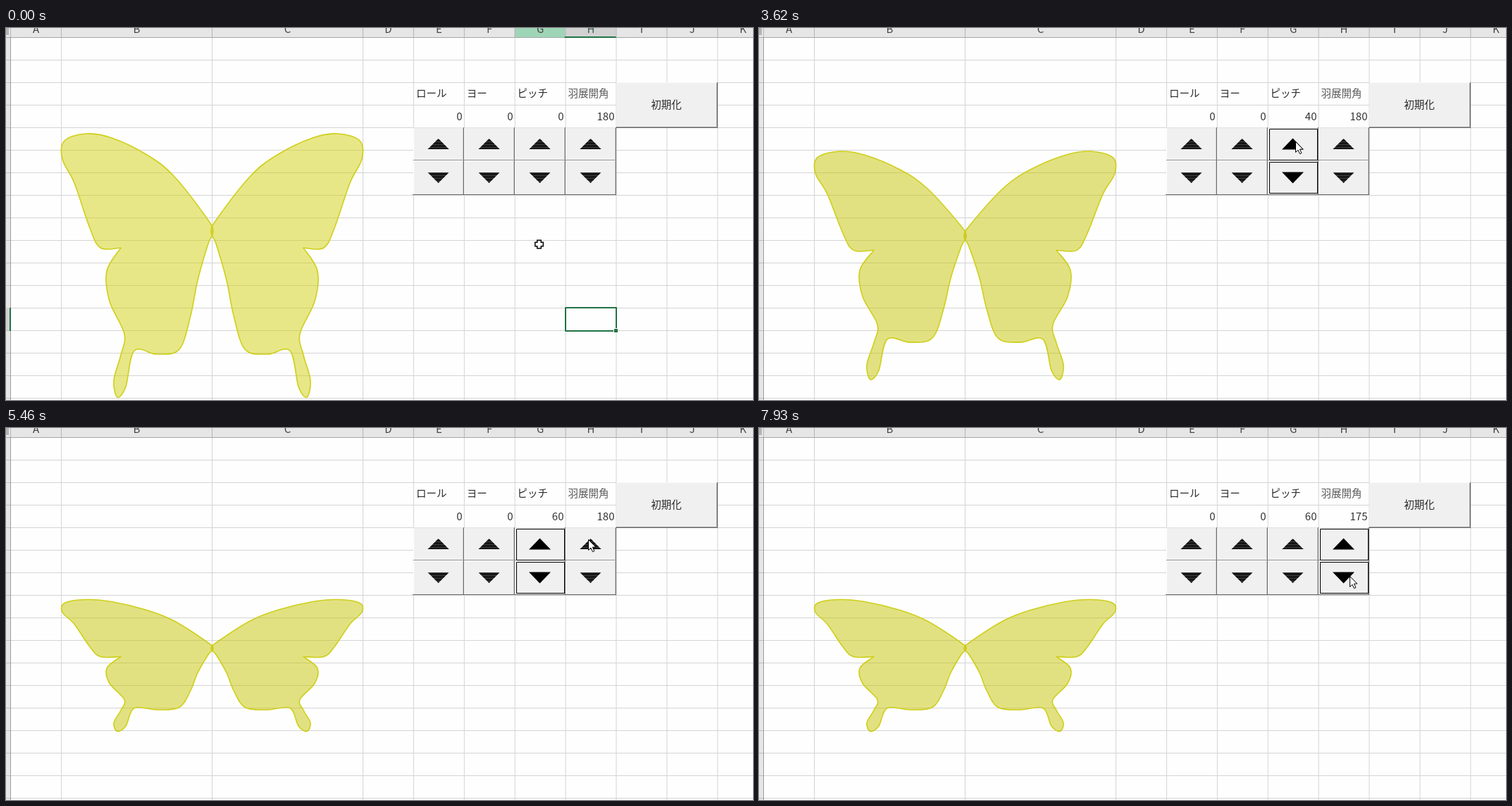
Animation of 1060x528 px, one loop 7.99 s. Source, as an HTML page with a canvas:

```html
<!DOCTYPE html>
<html lang="ja">
<head>
<meta charset="utf-8">
<style>
html, body { margin: 0; width: 100%; height: 100%; overflow: hidden; background: #fefefe; }
canvas { display: block; width: 1060px; height: 528px; }
</style>
</head>
<body>
<canvas id="stage" width="1060" height="528"></canvas>
<script>
const ctx = document.getElementById('stage').getContext('2d');
const LOOP = 7990;
const FONT = '"Noto Sans CJK JP", "Noto Sans CJK", sans-serif';
const GREEN = '#217346';
const AXIS = 292.5, MID = 337, ROW = 32;
const RELEASE = 1710;
const PITCH = 2, SPREAD = 3;

// Left edge of column i: A is narrow, B and C wide, the rest even
const colX = i => i === 0 ? 6 : i < 3 ? 78 + 214 * (i - 1) : 506 + 71.9 * (i - 3);

// Key points of the left wing, from the notch round to the notch again
const WING = [
  [163, 312], [143, 345], [147, 388], [168, 434], [163, 464], [153, 500], [158, 524],
  [170, 509], [182, 458], [214, 463], [246, 456], [262, 408], [272, 358], [287, 306],
  [294, 289], [285, 270], [238, 210], [200, 180], [150, 156], [114, 150], [83, 160],
  [80, 186], [97, 220], [119, 284], [134, 312], [163, 312]
];

// Runs of clicks; short gaps are a held button
const RUNS = [
  { col: PITCH, start: RELEASE, by: 0 },
  { col: PITCH, start: 2090, gap: 580, count: 2 },
  { col: PITCH, start: 2980, gap: 125, count: 6 },
  { col: PITCH, start: 3860, gap: 150, count: 3 },
  { col: PITCH, start: 4610 },
  { col: SPREAD, start: 5750 },
  { col: SPREAD, start: 6070, gap: 200, count: 2 },
  { col: SPREAD, start: 6770 },
  { col: SPREAD, start: 7370, gap: 120, count: 5, by: -5 }
];
const CLICKS = RUNS.flatMap(({ col, start, gap = 500, count = 1, by = 5 }) =>
  Array.from({ length: count }, (_, i) => ({ col, by, at: start + i * gap, single: gap > 180 })));

// Pointer moves: start, end, destination
const HOME = [757, 307];
const MOVES = [
  [870, 1600, 762, 168], [RELEASE, 1880, 761, 161], [4930, 5700, 845, 157], [7010, 7330, 838, 210]
];

const clickSum = (col, t) => CLICKS.reduce((v, c) => c.col === col && c.at <= t ? v + c.by : v, 0);
const pitchAt = t => clickSum(PITCH, t);
const spreadAt = t => 180 + clickSum(SPREAD, t);
const focusAt = t => CLICKS.reduce((v, c) => c.at <= t ? c.col : v, -1);
const pressedAt = t => CLICKS.some(c => c.single && t >= c.at && t < c.at + 90);

function mouseAt(t) {
  return MOVES.reduce(([x, y], [t0, t1, toX, toY]) => {
    const u = Math.max(0, Math.min(1, (t - t0) / (t1 - t0))), e = u * u * (3 - 2 * u);
    return [x + (toX - x) * e, y + (toY - y) * e];
  }, HOME);
}

function rect(x, y, w, h, color) {
  ctx.fillStyle = color;
  ctx.fillRect(x, y, w, h);
}

function frame(x, y, w, h, color, line = 1) {
  ctx.strokeStyle = color;
  ctx.lineWidth = line;
  ctx.strokeRect(x + line / 2, y + line / 2, w - line, h - line);
}

function text(s, x, y, align = 'left', color = '#2a2a2a', size = 14.5) {
  ctx.font = size + 'px ' + FONT;
  ctx.textAlign = align;
  ctx.fillStyle = color;
  ctx.fillText(s, x, y);
}

function poly(points) {
  ctx.beginPath();
  points.forEach(([x, y]) => ctx.lineTo(x, y));
  ctx.closePath();
}

function drawSheet(t) {
  rect(0, 0, 1060, 528, '#fefefe');
  for (let i = 0; i < 11; i++) rect(colX(i), 13, 1, 515, '#d4d4d4');
  for (let y = 45; y < 528; y += ROW) rect(6, y, 1054, 1, '#d4d4d4');

  rect(0, 0, 1060, 13, '#e6e6e6');
  rect(0, 0, 6, 528, '#e6e6e6');
  for (let y = 45; y < 528; y += ROW) rect(0, y, 6, 1, '#bcbcbc');
  const selected = t < RELEASE;
  const col = !selected ? -1 : t < 60 ? 7 : 6, y = t < 60 ? 397 : 301;
  if (t < 60) rect(colX(6), 0, 72, 13, '#9fd5b7');
  if (selected) {
    rect(colX(col), 0, 72, 13, '#d2d2d2');
    rect(0, y, 6, ROW, '#d2d2d2');
  }
  rect(0, 13, 1060, 1, '#a6a6a6');
  rect(6, 13, 1, 515, '#9c9c9c');
  rect(0, 0, 4, 10, '#b4b4b4');
  [...'ABCDEFGHIJK'].forEach((c, i) => {
    rect(colX(i), 0, 1, 13, '#b4b4b4');
    text(c, (colX(i) + colX(i + 1)) / 2 + .5, 7, 'center', i === col ? '#3a5a48' : '#444', 15);
  });
  if (selected) {
    rect(colX(col) - 1, 12, 73, 2, GREEN);
    rect(5, y, 2, ROW + 1, GREEN);
  }
}

// The selection slides to the clicked cell in three hops
function drawSelection(t) {
  if (t >= RELEASE) return;
  const u = Math.max(0, Math.min(3, Math.floor((t - 5) / 55))) / 3;
  const x = Math.round(793 - 72 * u), y = Math.round(396 - 96 * u);
  rect(x, y, 74, 35, '#fefefe');
  frame(x, y, 74, 35, GREEN, 2);
  rect(x + 69, y + 30, 6, 6, '#fefefe');
  rect(x + 70, y + 31, 5, 5, GREEN);
  if (t >= 370 && (t - 370) % 1060 < 530) rect(725, 306, 1, 24, '#000');
}

// Turn each wing about the body by the spread, then tilt by the pitch
function wingPath(side, pitch, spread) {
  const p = pitch * Math.PI / 180, a = (spread - 180) * Math.PI / 360;
  const pts = WING.map(([x, y]) => {
    const d = AXIS - x;
    return [AXIS - side * d * Math.cos(a),
      MID + (y - MID) * Math.cos(p) + d * Math.sin(a) * Math.sin(p)];
  });
  const n = pts.length - 1, at = i => pts[Math.max(0, Math.min(n, i))];
  ctx.beginPath();
  ctx.moveTo(...pts[0]);
  for (let i = 0; i < n; i++) {
    const [o, b, c, d] = [at(i - 1), at(i), at(i + 1), at(i + 2)];
    ctx.bezierCurveTo(b[0] + (c[0] - o[0]) / 6, b[1] + (c[1] - o[1]) / 6,
      c[0] - (d[0] - b[0]) / 6, c[1] - (d[1] - b[1]) / 6, c[0], c[1]);
  }
  ctx.closePath();
}

// Redrawing the wings trails the numbers a little
function drawButterfly(t) {
  const pitch = pitchAt(t - 145), spread = spreadAt(t - 85);
  const shade = Math.min(1, (pitch / 30) ** 2);
  const c = 210 - 12 * shade, b = 18 - 12 * shade;
  ctx.strokeStyle = 'rgba(204, 204, 16, .92)';
  ctx.lineWidth = 1.6;
  ctx.lineJoin = 'round';
  for (const side of [1, -1]) {
    wingPath(side, pitch, spread);
    ctx.fillStyle = `rgba(${c}, ${c}, ${b}, .5)`;
    ctx.fill();
    ctx.stroke();
  }
}

function triangle(x, y, dir, focused) {
  const w = focused ? 15.5 : 15, h = focused ? 8 : 7.5;
  ctx.save();
  poly([[x - w, y + h * dir], [x + w, y + h * dir], [x, y - h * dir]]);
  ctx.fillStyle = focused ? '#000' : '#363636';
  ctx.fill();
  if (!focused) {
    ctx.clip();
    for (let k = -6; k < 8; k += 4) rect(x - 16, y + k, 32, 2, '#0a0a0a');
  }
  ctx.restore();
}

function drawSpinner(i, focused, pressed) {
  const x = 578 + 72 * i;
  rect(x, 141, 72, 96, '#f0f0f0');
  rect(x, 141, 1, 95, '#fff');
  rect(x, 141, 72, 1, '#e3e3e3');
  rect(x, 187, 72, 1, '#909090');
  rect(x, 188, 72, 1, '#fff');
  rect(x + 70, 142, 1, 94, '#c0c0c0');
  rect(x + 71, 141, 1, 96, '#707070');
  rect(x - 1, 236, 73, 1, '#696969');
  if (pressed) {
    rect(x, 141, 71, 1, '#888');
    rect(x, 141, 1, 46, '#888');
  }
  if (focused) {
    const top = pressed ? 144 : 143;
    frame(x + 2, top, 69, 188 - top, '#000');
    frame(x + 2, 190, 69, 45, '#000');
  }
  triangle(x + 35.5, 164.5, 1, focused);
  triangle(x + 35.5, 212.5, -1, focused);
}

function drawPanel(t, pressed) {
  const labels = ['ロール', 'ヨー', 'ピッチ', '羽展開角'];
  const values = [0, 0, pitchAt(t), spreadAt(t)];
  const focus = focusAt(t);
  labels.forEach((s, i) => {
    text(s, 582 + 71.8 * i, 98, 'left', i < 3 ? '#2a2a2a' : '#5a5a5a');
    text(values[i], 647.5 + 72 * i, 131, 'right', '#333', 15);
    drawSpinner(i, i === focus, pressed && i === focus);
  });
  rect(866, 77, 144, 65, '#f0f0f0');
  rect(866, 77, 143, 1, '#fafafa');
  rect(866, 140, 143, 1, '#a0a0a0');
  rect(866, 141, 144, 1, '#696969');
  rect(1008, 78, 1, 63, '#a0a0a0');
  rect(1009, 77, 1, 65, '#696969');
  text('初期化', 937, 114, 'center');
}

function drawCross(x, y) {
  const plus = (r, w, color) => {
    rect(x - r, y - w, 2 * r, 2 * w, color);
    rect(x - w, y - r, 2 * w, 2 * r, color);
  };
  plus(6.5, 3.5, '#000');
  plus(5, 2, '#fff');
}

function drawBeam(x, y) {
  rect(x, y - 7, 1, 15, '#000');
  for (const end of [-8, 8]) {
    rect(x - 3, y + end, 3, 1, '#000');
    rect(x + 1, y + end, 3, 1, '#000');
  }
}

function drawArrow(x, y) {
  ctx.save();
  ctx.translate(x + .5, y + .5);
  poly([[0, 0], [0, 15], [3.4, 11.7], [6, 17.2], [8.4, 16], [5.9, 10.7], [10.4, 10.5]]);
  ctx.fillStyle = '#fff';
  ctx.fill();
  ctx.strokeStyle = '#000';
  ctx.lineWidth = 1;
  ctx.lineJoin = 'miter';
  ctx.stroke();
  ctx.restore();
}

function drawRing(x, y) {
  ctx.lineWidth = 1.1;
  for (const [r, color] of [[8, '#fff'], [9, '#000']]) {
    ctx.beginPath();
    ctx.arc(x, y, r, 0, 7);
    ctx.strokeStyle = color;
    ctx.stroke();
  }
}

function drawMouse(t, pressed) {
  const [x, y] = mouseAt(t).map(Math.round);
  if (pressed) drawRing(x + 1, y + 4);
  if (y < 237) drawArrow(x, y);
  else if (t >= 320 && y > 301) drawBeam(x, y - 1);
  else drawCross(x - .5, y);
}

function draw(t) {
  const pressed = pressedAt(t);
  drawSheet(t);
  drawSelection(t);
  drawButterfly(t);
  drawPanel(t, pressed);
  drawMouse(t, pressed);
}

const begin = performance.now();
function tick() {
  draw((performance.now() - begin) % LOOP);
  requestAnimationFrame(tick);
}
tick();
</script>
</body>
</html>
```
